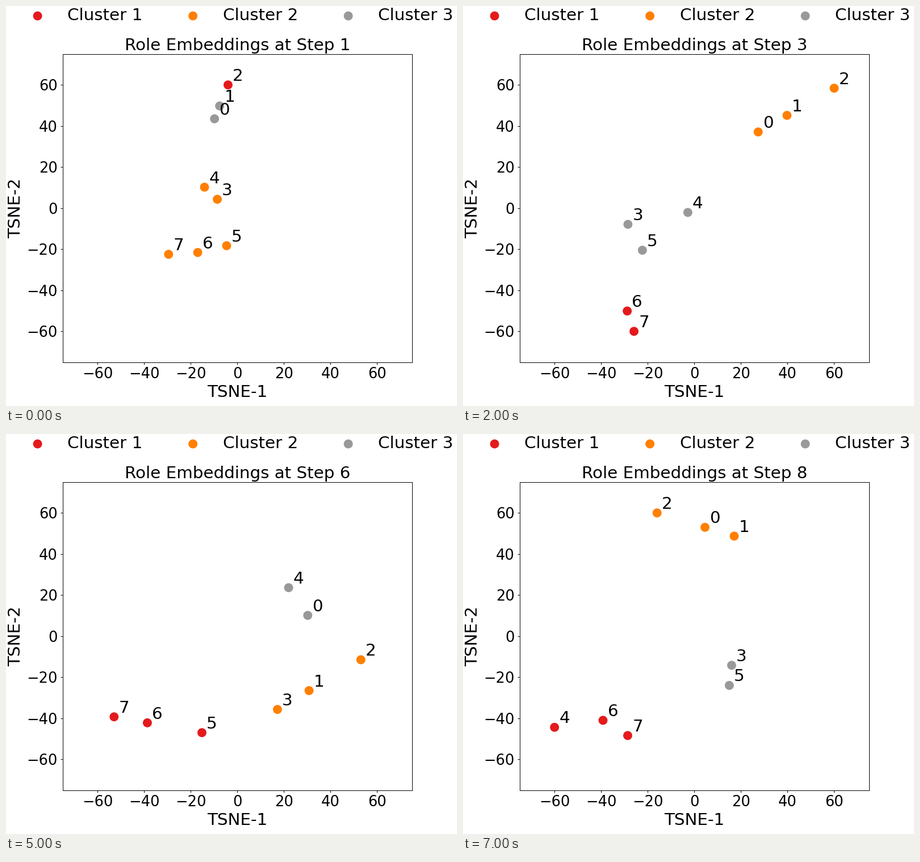
Animation, 794 px wide and 706 px high, one loop 8 s. Source, as a matplotlib script:

```python
import numpy as np
import matplotlib.pyplot as plt
from matplotlib.animation import FuncAnimation

W, H, DPI = 794, 706, 100
K = 0.8825  # point scale of a 9 x 8 inch layout shrunk to the stage
BIG, SMALL = 24 * K, 21 * K
DOT = dict(s=131 * K**2, linewidths=1.5 * K)
COLORS = ["#e41a1c", "#ff7f00", "#999999"]
RED, ORANGE, GREY = COLORS
SPREAD = 1.4  # gaps widen along a chain
BANDS = [ORANGE] * 3 + [GREY] * 3 + [RED] * 2


def chain(roles, colors, *keys):
    """Spread roles along the path through the key points."""
    if isinstance(colors, str):
        colors = [colors] * len(roles)
    knots = np.linspace(0, 1, len(keys)) ** SPREAD
    t = np.linspace(0, 1, len(roles)) ** SPREAD
    xs, ys = (np.interp(t, knots, axis) for axis in zip(*keys))
    return zip(map(int, roles), colors, xs, ys)


# Each step is a few chains of neighbouring roles
STEPS = [
    [chain("012", [GREY, GREY, RED], (-9.8, 43.5), (-4, 60)),
     chain("43", ORANGE, (-14.1, 10.2), (-8.6, 4.3)),
     chain("765", ORANGE, (-29.5, -22.5), (-17, -21.6), (-4.6, -18.3))],
    [chain("01234567", BANDS, (20, 54), (-33.4, -60))],
    [chain("012", ORANGE, (27.4, 37.1), (60, 58.4)),
     chain("354", GREY, (-28.5, -7.9), (-22.3, -20.5), (-2.8, -2.1)),
     chain("67", RED, (-28.8, -50.1), (-25.9, -60))],
    [chain("02", GREY, (20.6, -49.8), (36.1, -47)),
     chain("134", RED, (4.7, 60), (-5.7, 6.8), (2.7, -25.5)),
     chain("765", ORANGE, (-60, 19.2), (-24.1, 11.2))],
    [chain("21", RED, (-34.7, 23.6), (-12, 35.4)),
     chain("04", GREY, (-18.9, 13.7), (-9, 7.9)),
     chain("35", ORANGE, (6.7, 42.8), (18.5, 47.9)),
     chain("67", ORANGE, (46, 59.2), (60, 60))],
    [chain("765", RED, (-52.9, -39.3), (-15.2, -47)),
     chain("312", ORANGE, (17.2, -35.7), (53, -11.5)),
     chain("40", GREY, (22, 23.6), (30.2, 10.1))],
    [chain("01234567", BANDS, (30, 45), (-60, -52.4))],
    [chain("102", ORANGE, (17.1, 48.7), (-16, 60)),
     chain("35", GREY, (16, -14.2), (15, -24)),
     chain("764", RED, (-28.6, -48.4), (-39.2, -41), (-60, -44.4))],
]
STEPS = [sorted(dot for part in step for dot in part) for step in STEPS]

plt.rcParams.update({
    "font.family": "DejaVu Sans",
    "axes.linewidth": 0.8 * K,
    "xtick.major.width": 0.8 * K, "ytick.major.width": 0.8 * K,
    "xtick.major.size": 3.5 * K, "ytick.major.size": 3.5 * K,
    "xtick.major.pad": 3.5 * K, "ytick.major.pad": 3.5 * K,
})

fig = plt.figure(figsize=(W / DPI, H / DPI), dpi=DPI, facecolor="white")
ax = fig.add_axes([99.6 / W, 77.4 / H, 615.4 / W, 543.7 / H])
ax.set(xlim=(-75, 75), ylim=(-75, 75),
       xticks=range(-60, 61, 20), yticks=range(-60, 61, 20))
ax.tick_params(labelsize=SMALL)
ax.set_xlabel("TSNE-1", fontsize=BIG, labelpad=4 * K)
ax.set_ylabel("TSNE-2", fontsize=BIG, labelpad=4 * K)
title = ax.set_title("", fontsize=BIG, pad=6 * K)

# Legend row, laid out in stage pixels
top = fig.add_axes([0, 0, 1, 1])
top.set(xlim=(0, W), ylim=(H, 0))
top.axis("off")
shifts = 273.5 * np.arange(3)
top.scatter(55.6 + shifts, np.full(3, 17.5), c=COLORS, **DOT)
for i, shift in enumerate(shifts):
    top.text(108.1 + shift, 25.4, f"Cluster {i + 1}", fontsize=BIG)

dots = ax.scatter(np.zeros(8), np.zeros(8), color="white", **DOT)
labels = [ax.text(0, 0, str(i), fontsize=BIG) for i in range(8)]


def draw(frame):
    _, colors, xs, ys = zip(*STEPS[frame])
    title.set_text(f"Role Embeddings at Step {frame + 1}")
    dots.set_offsets(np.column_stack([xs, ys]))
    dots.set_color(colors)
    for label, x, y in zip(labels, xs, ys):
        label.set_position((x + 2, y + 2))
    return [title, dots, *labels]


anim = FuncAnimation(fig, draw, frames=len(STEPS), interval=1000,
                     init_func=lambda: draw(0), repeat=True, repeat_delay=0)
plt.show()
```
